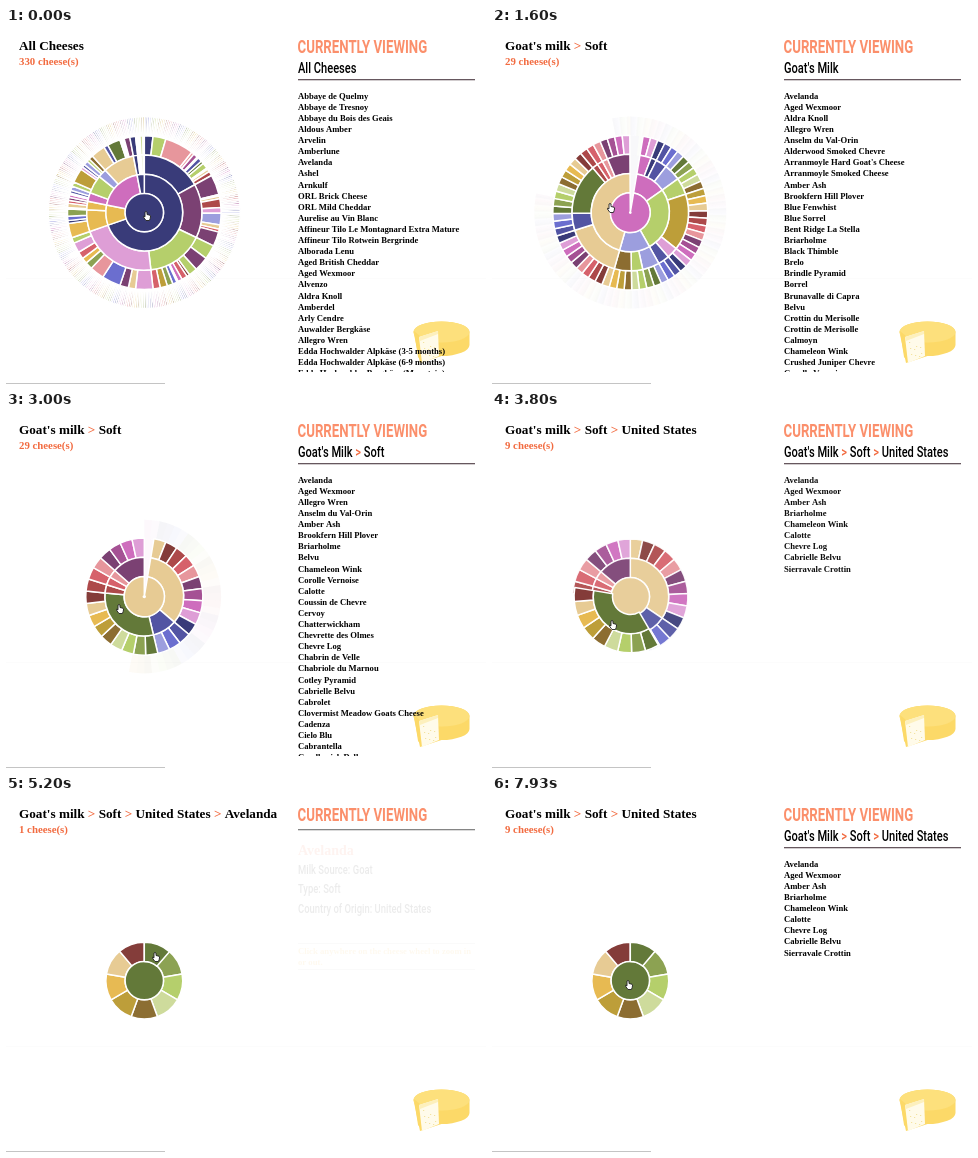
An HTML page with a canvas for the animation above (8 s loop, 480x356 px).

```html
<!DOCTYPE html>
<html lang="en">
<head>
<meta charset="utf-8">
<title>Cheese wheel</title>
<style>
  html, body { margin: 0; width: 100%; height: 100%; overflow: hidden; background: #fff; }
  canvas { display: block; width: 480px; height: 356px; }
</style>
</head>
<body>
<canvas id="stage"></canvas>
<script>
const W = 480, H = 356, LOOP = 8000, TAU = Math.PI * 2;
const canvas = document.getElementById('stage');
const ctx = canvas.getContext('2d');
const density = window.devicePixelRatio || 1;
canvas.width = W * density;
canvas.height = H * density;

const SLAB = '"Liberation Serif", serif', SANS = 'Roboto, sans-serif';
const ORANGE = '#f26b40', SALMON = '#fb8f6b', INK = '#000';
const PALETTE = ('393b79 5254a3 6b6ecf 9c9ede 637939 8ca252 b5cf6b cedb9c 8c6d31 bd9e39 ' +
  'e7ba52 e7cb94 843c39 ad494a d6616b e7969c 7b4173 a55194 ce6dbd de9ed6').split(' ');

// Milk > type > number of cheeses per country
const MILKS = [
  [[6, 9, 20, 2, 3, 1, 3, 2, 4, 1, 2, 3], [14, 1, 2, 6, 4, 8, 3, 2, 10],
   [10, 10, 6, 2, 4, 3, 1, 3, 4, 5, 5], [12, 5, 6, 13, 10, 5, 4, 5, 7, 4]],
  [[10, 2, 3, 5], [1, 3, 2, 2]],
  [[2, 1, 2, 3], [3, 10, 2, 2], [3, 2, 3], [10, 3, 9, 1, 1, 1, 4]],
  [[4], [1], [1], [1], [2], [1]]
];

// Positions are counted in leaves; each node takes the colour of its first leaf.
const nodes = [];
let leafCount = 0;
function build(spec, depth) {
  const node = { depth, x0: leafCount, children: [] };
  nodes.push(node);
  if (depth === 4) leafCount++;
  else {
    const parts = depth === 3 ? Array(spec).fill(0) : spec;
    node.children = parts.map(part => build(part, depth + 1));
  }
  node.x1 = leafCount;
  node.color = '#' + PALETTE[node.x0 % PALETTE.length];
  return node;
}
const root = build(MILKS, 0);
const goat = root.children[2], soft = goat.children[3];
const states = soft.children[2], cheese = states.children[0];
nodes.sort((a, b) => b.depth - a.depth);

const US_LIST = ['Avelanda', 'Aged Wexmoor', 'Amber Ash', 'Briarholme', 'Chameleon Wink',
  'Calotte', 'Chevre Log', 'Cabrielle Belvu', 'Sierravale Crottin'];
const ALL_LIST = ['Abbaye de Quelmy', 'Abbaye de Tresnoy', 'Abbaye du Bois des Geais',
  'Aldous Amber', 'Arvelin', 'Amberlune', 'Avelanda', 'Ashel', 'Arnkulf', 'ORL Brick Cheese',
  'ORL Mild Cheddar', 'Aurelise au Vin Blanc', 'Affineur Tilo Le Montagnard Extra Mature',
  'Affineur Tilo Rotwein Bergrinde', 'Alborada Lenu', 'Aged British Cheddar', 'Aged Wexmoor',
  'Alvenzo', 'Aldra Knoll', 'Amberdel', 'Arly Cendre', 'Auwalder Bergkäse', 'Allegro Wren',
  'Edda Hochwalder Alpkäse (3-5 months)', 'Edda Hochwalder Alpkäse (6-9 months)',
  'Edda Hochwalder Bergkäse (Mountain)'];
const GOAT_LIST = ['Avelanda', 'Aged Wexmoor', 'Aldra Knoll', 'Allegro Wren', 'Anselm du Val-Orin',
  'Alderwood Smoked Chevre', "Arranmoyle Hard Goat's Cheese", 'Arranmoyle Smoked Cheese',
  'Amber Ash', 'Brookfern Hill Plover', 'Blue Fenwhist', 'Blue Sorrel', 'Bent Ridge La Stella',
  'Briarholme', 'Black Thimble', 'Brelo', 'Brindle Pyramid', 'Borrel', 'Brunavalle di Capra',
  'Belvu', 'Crottin du Merisolle', 'Crottin de Merisolle', 'Calmoyn', 'Chameleon Wink',
  'Crushed Juniper Chevre', 'Corolle Vernoise'];
const SOFT_LIST = ['Avelanda', 'Aged Wexmoor', 'Allegro Wren', 'Anselm du Val-Orin', 'Amber Ash',
  'Brookfern Hill Plover', 'Briarholme', 'Belvu', 'Chameleon Wink', 'Corolle Vernoise', 'Calotte',
  'Coussin de Chevre', 'Cervoy', 'Chatterwickham', 'Chevrette des Olmes', 'Chevre Log',
  'Chabrin de Velle', 'Chabriole du Marnou', 'Cotley Pyramid', 'Cabrielle Belvu', 'Cabrolet',
  'Clovermist Meadow Goats Cheese', 'Cadenza', 'Cielo Blu', 'Cabrantella', 'Candlewick Dell'];

const US_TITLE = ["Goat's Milk", 'Soft', 'United States'];
const clicks = [
  { at: -1000, node: root, title: ['All Cheeses'], list: ALL_LIST },
  { at: 805, node: goat, title: US_TITLE.slice(0, 1), list: GOAT_LIST },
  { at: 2232, node: soft, title: US_TITLE.slice(0, 2), list: SOFT_LIST },
  { at: 3540, node: states, title: US_TITLE, list: US_LIST },
  { at: 5110, node: cheese },
  { at: 6900, node: states, title: US_TITLE, list: US_LIST }
];
const PATH = ["Goat's milk", 'Soft', 'United States', 'Avelanda'];
const hovers = [
  { at: 0, crumbs: ['All Cheeses'], count: 330 },
  { at: 400, crumbs: PATH.slice(0, 1), count: 62 },
  { at: 1200, crumbs: PATH.slice(0, 2), count: 29 },
  { at: 3250, crumbs: PATH.slice(0, 3), count: 9 },
  { at: 4850, crumbs: PATH, count: 1 },
  { at: 7300, crumbs: PATH.slice(0, 3), count: 9 }
];
// time, x, y
const pointer = [[0, 141, 188], [150, 141, 188], [620, 117, 165], [900, 117, 165], [1500, 119, 180],
  [2300, 119, 180], [3000, 114, 197], [3500, 121, 213], [4300, 121, 213], [5000, 150, 161],
  [5600, 150, 161], [6400, 137, 189], [LOOP, 137, 189]];

const mix = (a, b, k) => a + (b - a) * k;
const clamp = v => Math.max(0, Math.min(1, v));
const cubicInOut = t => t < .5 ? 4 * t ** 3 : 1 - 4 * (1 - t) ** 3;
const smooth = t => t * t * (3 - 2 * t);
const progress = (t, start, duration) => cubicInOut(clamp((t - start) / duration));
const lastIndex = (events, t) => events.findLastIndex(e => e.at <= t);

function text(string, x, y, font, color) {
  ctx.font = font;
  ctx.fillStyle = color;
  ctx.fillText(string, x, y);
  return x + ctx.measureText(string).width;
}
function crumbs(parts, x, y, font) {
  parts.forEach((part, i) => {
    if (i) x = text(' > ', x, y, font, ORANGE);
    x = text(part, x, y, font, INK);
  });
}
// Narrow sign-style lettering
function condensed(x, y, draw) {
  ctx.save();
  ctx.translate(x, y);
  ctx.scale(.72, 1);
  draw();
  ctx.restore();
}
function shape(color, points) {
  ctx.fillStyle = color;
  ctx.beginPath();
  points.forEach(([x, y]) => ctx.lineTo(x, y));
  ctx.fill();
}
function rule(x, y, width, color, height = 1) {
  ctx.fillStyle = color;
  ctx.fillRect(x, y, width, height);
}

// Start angle, end angle, inner and outer radius of a node while `view` is the centre
function pose(node, view) {
  const angle = x => clamp((x - view.x0) / (view.x1 - view.x0)) * TAU;
  const radius = depth => Math.max(0, depth - view.depth) * 19.2;
  return [angle(node.x0), angle(node.x1), radius(node.depth), radius(node.depth + 1)];
}
function drawArc([a0, a1, r0, r1], color) {
  if (a1 - a0 < 1e-4 || r1 < .1) return;
  const full = a1 - a0 > TAU - 1e-4;
  ctx.beginPath();
  if (!full && !r0) ctx.moveTo(0, 0);
  ctx.arc(0, 0, r1, a0, a1);
  if (full) {
    ctx.closePath();
    ctx.moveTo(r0, 0);
  }
  if (r0) ctx.arc(0, 0, r0, a1, a0, true);
  ctx.closePath();
  ctx.fillStyle = color;
  ctx.fill();
  ctx.stroke();
}
// The branch being entered or left moves; everything around it fades in place.
function drawWheel(t) {
  const i = lastIndex(clicks, t), to = clicks[i].node, from = clicks[Math.max(0, i - 1)].node;
  const k = progress(t, clicks[i].at, 1000);
  const zoomIn = to.depth >= from.depth;
  const [inner, outer] = zoomIn ? [to, from] : [from, to];
  const moves = n => n.depth >= inner.depth && n.x0 >= inner.x0 && n.x1 <= inner.x1;

  ctx.save();
  ctx.translate(138.3, 184.6);
  ctx.rotate(-TAU / 4);
  ctx.strokeStyle = '#fff';
  ctx.lineWidth = 1.5;
  ctx.lineJoin = 'round';
  ctx.globalAlpha = zoomIn ? 1 - k : k;
  for (const node of nodes) if (!moves(node)) drawArc(pose(node, outer), node.color);
  ctx.globalAlpha = 1;
  for (const node of nodes) {
    if (!moves(node)) continue;
    const end = pose(node, to);
    drawArc(pose(node, from).map((v, j) => mix(v, end[j], k)), node.color);
  }
  ctx.restore();
}

function drawCheese() {
  const top = '#fde07c', side = '#fcd968';
  ctx.fillStyle = side;
  ctx.beginPath();
  ctx.ellipse(435.5, 304, 28, 10.5, 0, Math.PI, TAU);
  ctx.lineTo(463.5, 317);
  ctx.ellipse(435.5, 317, 28, 11, 0, 0, TAU / 4);
  ctx.lineTo(414, 335);
  ctx.lineTo(407.5, 304);
  ctx.fill();
  ctx.fillStyle = top;
  ctx.beginPath();
  ctx.ellipse(435.5, 304, 28, 10.5, 0, 0, TAU);
  ctx.fill();
  shape(side, [[408, 303], [414, 308], [417, 335], [412, 329]]);
  shape('#fffbea', [[413, 309], [432, 303], [433, 328], [416, 335]]);
  shape('#fdf0bd', [[413, 309], [432, 303], [432, 306], [414, 313]]);
  ctx.fillStyle = '#f3e3a0';
  for (let i = 0; i < 9; i++) ctx.fillRect(417 + i * 5 % 14, 314 + i * 7 % 15, 1.2, 1);
}

function drawDetail() {
  ['Milk Source: Goat', 'Type: Soft', 'Country of Origin: United States'].forEach((line, i) =>
    condensed(292, 77.5 + i * 19.7, () => text(line, 0, 0, `500 13.1px ${SANS}`, INK)));
  text(PATH[3], 292, 58.5, `bold 14px ${SLAB}`, ORANGE);
  rule(292, 147, 177, '#bbb');
  rule(292, 173, 177, '#bbb');
  const note = `bold 8.7px ${SLAB}`;
  text('Click anywhere on the cheese wheel to zoom in', 292, 158, note, '#f0ad32');
  text('or out.', 292, 169, note, '#f0ad32');
}

function drawList(list) {
  ctx.save();
  ctx.beginPath();
  ctx.rect(280, 55, 200, 289);
  ctx.clip();
  list.forEach((name, i) => text(name, 292, 70.7 + i * 11.1, `bold 8.6px ${SLAB}`, INK));
  ctx.restore();
}

function drawPanel(t) {
  const { at, title, list } = clicks[lastIndex(clicks, t)];
  condensed(291.5, 25.3, () => text('CURRENTLY VIEWING', 0, 0, `bold 18.4px ${SANS}`, SALMON));
  if (title) condensed(292, 45.2, () => crumbs(title, 0, 0, `500 15.4px ${SANS}`));
  rule(292, title ? 51 : 33, 177, title ? '#66575e' : '#858585', 1.3);
  ctx.globalAlpha = progress(t, at, 340);
  if (list) drawList(list);
  else drawDetail();
  ctx.globalAlpha = 1;
}

function drawPointer(t) {
  const i = pointer.findIndex(p => p[0] > t), a = pointer[i - 1], b = pointer[i];
  const k = smooth((t - a[0]) / (b[0] - a[0]));
  ctx.save();
  ctx.translate(mix(a[1], b[1], k), mix(a[2], b[2], k));
  ctx.beginPath();
  [[-2, -4], [-1, -4.5], [0, -4], [0, -1.5], [3, -.8], [3.6, 0], [3.2, 2.5], [2.4, 4.5],
   [-1, 4.5], [-3.6, 1], [-3.4, .2], [-2, .8]].forEach(([x, y]) => ctx.lineTo(x, y));
  ctx.closePath();
  ctx.fillStyle = '#fff';
  ctx.strokeStyle = '#222';
  ctx.lineWidth = .9;
  ctx.fill();
  ctx.stroke();
  ctx.restore();
}

function draw(t) {
  ctx.setTransform(density, 0, 0, density, 0, 0);
  rule(0, 0, W, '#fff', H);
  rule(0, 250, W, '#fcfcfc');
  rule(0, 355, 159, '#c4c4c4');

  const hover = hovers[lastIndex(hovers, t)];
  crumbs(hover.crumbs, 13, 22.2, `bold 13.2px ${SLAB}`);
  text(`${hover.count} cheese(s)`, 13, 37.2, `bold 10.8px ${SLAB}`, ORANGE);
  drawWheel(t);
  drawCheese();
  drawPanel(t);
  drawPointer(t);
}

function tick() {
  draw(performance.now() % LOOP);
  requestAnimationFrame(tick);
}
tick();
</script>
</body>
</html>
```
